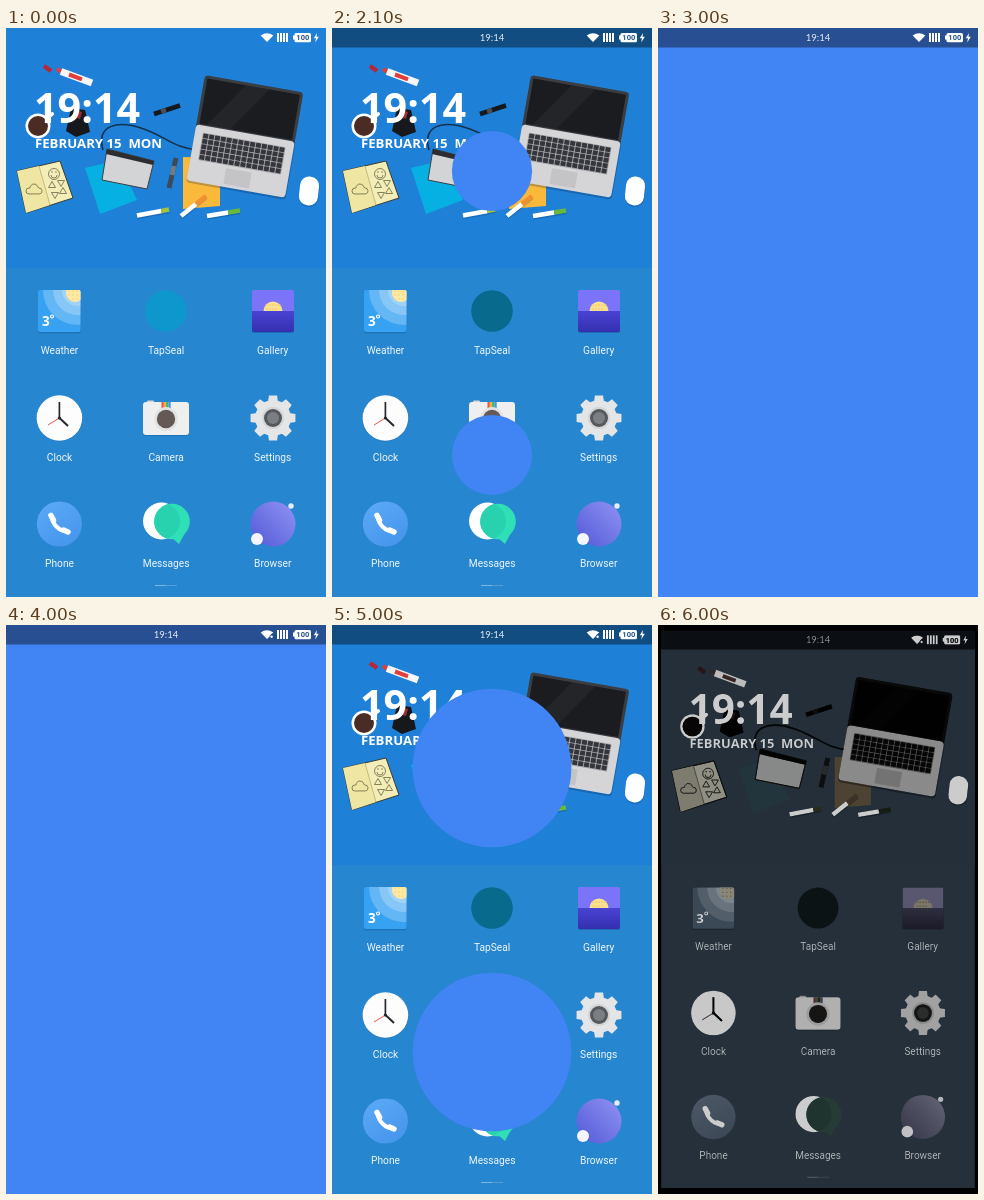
These frames come from a looping animation (320x569 px, 6100 ms). An HTML page with a canvas:

```html
<!DOCTYPE html>
<html lang="en">
<head>
<meta charset="utf-8">
<title>Home screen reveal</title>
<style>
html, body { margin: 0; width: 100%; height: 100%; overflow: hidden; background: #000; }
canvas { display: block; width: 100%; height: 100%; }
svg { position: absolute; }
</style>
</head>
<body>
<canvas id="stage"></canvas>
<svg width="0" height="0">
  <filter id="fade" x="0" y="0" width="1" height="1" color-interpolation-filters="sRGB">
    <feColorMatrix id="mix" type="matrix"/>
    <feComponentTransfer>
      <feFuncR type="gamma"/><feFuncG type="gamma"/><feFuncB type="gamma"/>
    </feComponentTransfer>
  </filter>
</svg>
<script>
const W = 320, H = 569, LOOP = 6100, STEP = 100;
const TAU = Math.PI * 2;
const canvas = document.getElementById('stage');
const c = canvas.getContext('2d');
const dpr = window.devicePixelRatio || 1;
canvas.width = Math.round(W * dpr);
canvas.height = Math.round(H * dpr);

// Drawing helpers
function fill(color) { c.fillStyle = color; c.fill(); }

function disc(x, y, r, color) {
  c.beginPath();
  c.arc(x, y, r, 0, TAU);
  fill(color);
}

function rect(x, y, w, h, color, r = 0) {
  c.beginPath();
  c.roundRect(x, y, w, h, r);
  fill(color);
}

function poly(points, color, edge, width = 1) {
  c.beginPath();
  for (let i = 0; i < points.length; i += 2) c.lineTo(points[i], points[i + 1]);
  c.closePath();
  if (color) fill(color);
  if (edge) { c.strokeStyle = edge; c.lineWidth = width; c.stroke(); }
}

function line(x1, y1, x2, y2, width, color, cap = 'butt') {
  c.beginPath();
  c.moveTo(x1, y1);
  c.lineTo(x2, y2);
  c.lineCap = cap;
  c.lineWidth = width;
  c.strokeStyle = color;
  c.stroke();
}

function text(str, x, y, font, color, align = 'left') {
  c.font = font;
  c.fillStyle = color;
  c.textAlign = align;
  c.fillText(str, x, y);
}

function gradient(x1, y1, x2, y2, from, to) {
  const g = c.createLinearGradient(x1, y1, x2, y2);
  g.addColorStop(0, from);
  g.addColorStop(1, to);
  return g;
}

function clipped(path, draw) {
  c.save();
  c.beginPath();
  path();
  c.clip();
  draw();
  c.restore();
}

function turned(x, y, degrees, draw) {
  c.save();
  c.translate(x, y);
  c.rotate(degrees * TAU / 360);
  draw();
  c.restore();
}

// Wallpaper
function laptop() {
  rect(0, 50, 101, 59, 'rgba(0,30,70,.25)', 4);
  rect(0, 0, 100, 54, '#3a3d42', 4);
  rect(3, 3, 94, 46, '#1a1c20');
  poly([42, 3, 66, 3, 34, 49, 10, 49], 'rgba(255,255,255,.04)');
  rect(0, 50, 100, 57, '#d5d5d7', 4);
  rect(8, 57, 84, 28, '#a3a4a8', 1);
  for (let row = 0; row < 5; row++)
    for (let k = 0; k < 14; k++)
      rect(8.8 + k * 5.95, 57.8 + row * 5.4, 5, 4.6, '#34363b', 0.5);
  rect(37, 88, 26, 16, '#c4c4c7', 1);
}

function notebook() {
  poly([11, 143, 54, 133, 67, 170, 20, 185], '#f3edb8', '#3a3c34', 1);
  poly([11, 143, 33, 138, 44, 177, 20, 185], '#eee6a2');
  line(33, 138, 44, 177, 0.8, '#b8ae6c');
  c.strokeStyle = '#6b6748';
  c.lineWidth = 0.8;
  c.beginPath();
  c.arc(23, 163, 3, 1.6, 5);
  c.arc(28, 160, 4, 3.6, 6);
  c.arc(33, 163, 3, 4.6, 7.6);
  c.closePath();
  c.stroke();
  c.beginPath();
  c.arc(48, 146, 5.5, 0, TAU);
  c.moveTo(51, 147);
  c.arc(48, 147, 3, 0, Math.PI);
  c.stroke();
  disc(46, 144, 0.7, '#6b6748');
  disc(50, 144, 0.7, '#6b6748');
  for (const [x, y, s] of [[46, 157, 1], [55, 155, -1], [49, 167, -1], [57, 163, 1]])
    poly([x - 3.5, y + 2.5 * s, x + 3.5, y + 2.5 * s, x, y - 3.5 * s], null, '#6b6748', 0.8);
}

function marker(x1, y1, x2, y2, split, body, tip, width = 4.5) {
  const mx = x1 + (x2 - x1) * split, my = y1 + (y2 - y1) * split;
  line(x1, y1 + 1.5, x2, y2 + 1.5, width, 'rgba(0,30,70,.2)');
  line(x1, y1, mx, my, width, body);
  line(mx, my, x2, y2, width, tip);
}

function desk() {
  poly([79, 140, 112, 132, 131, 172, 94, 186], '#06b0e2');
  poly([177, 129, 214, 130, 214, 178, 177, 181], '#fbb93c');
  c.beginPath();
  c.moveTo(97, 122);
  c.bezierCurveTo(90, 96, 112, 92, 138, 101);
  c.bezierCurveTo(162, 110, 168, 120, 192, 122);
  c.strokeStyle = '#12324f';
  c.lineWidth = 1.6;
  c.stroke();
  turned(199, 47, 10, laptop);
  poly([101, 121, 148, 133, 141, 161, 96, 152], '#d3d4d6', '#3b3e43', 1);
  poly([101, 121, 148, 133, 147, 137, 100, 126], '#2b2d31');
  notebook();

  turned(303, 163, 6, () => {
    rect(-9, -13, 19, 29, 'rgba(0,30,70,.2)', 9);
    rect(-9.5, -14.5, 19, 29, '#fff', 9);
  });

  line(38, 92, 46, 86, 4, '#fff', 'round');
  disc(32, 98, 12.5, '#fff');
  disc(32, 98, 10, '#4b2c24');
  poly([65, 80, 79, 82, 84, 104, 70, 109, 60, 103], '#17181b');
  poly([69, 82, 76, 84, 74, 91, 67, 89], '#a02a32');

  line(38, 38, 45, 43, 4.5, '#b5283a');
  line(51, 41, 56, 44, 4, '#e23d3a');
  line(55, 43.5, 86, 55, 7, '#f6f6f6');
  line(63, 46.5, 76, 51.3, 4, '#e23d3a');
  line(148, 86, 174, 77.5, 4.5, '#15181d');
  line(155, 83.5, 160, 82, 4.5, '#4a4e55');
  line(170, 130, 163, 160, 5, '#3e4a5a');
  line(168, 138, 166, 147, 5, '#6d7b8c');
  marker(131, 187.5, 163, 181.5, 0.76, '#fff', '#a4c23a');
  marker(175, 188, 200, 168, 0.6, '#fff', '#f09030');
  marker(201, 188, 234, 182.5, 0.64, '#fff', '#68b83c');
}

// App icons
function weather() {
  rect(32, 263, 42.5, 42.5, 'rgba(0,40,90,.2)', 2);
  clipped(() => c.roundRect(32, 262, 42.5, 42, 2), () => {
    rect(32, 262, 43, 43, '#38a2f2');
    for (const r of [35, 25, 16]) disc(72, 262, r, 'rgba(255,255,255,.22)');
    disc(69, 265, 9, '#fde9a4');
    for (let i = 0; i < 12; i++)
      disc(63 + (i % 4) * 4, 263 + Math.floor(i / 4) * 4, 0.7, '#f5cf62');
  });
  text('3', 36, 298, 'bold 13.5px "Open Sans", sans-serif', '#fff');
  c.beginPath();
  c.arc(46, 288.5, 1.5, 0, TAU);
  c.strokeStyle = '#fff';
  c.lineWidth = 1.1;
  c.stroke();
}

function seal(pressed) {
  disc(160, 283, 20.8, pressed ? '#086a8c' : '#0e97cd');
}

function gallery() {
  rect(246, 263, 42, 42, 'rgba(0,30,90,.25)', 2);
  clipped(() => c.roundRect(246, 262, 42, 42, 2), () => {
    rect(246, 262, 42, 21, '#7b73f8');
    disc(267, 283, 9.5, '#fbe08f');
    for (let i = 0; i < 9; i++)
      disc(261 + (i % 5) * 3, 277 + Math.floor(i / 5) * 4, 0.6, '#e6a94c');
    rect(246, 283, 42, 21, gradient(0, 283, 0, 304, '#4a43d2', '#352fb0'));
  });
}

function clock() {
  disc(53.4, 390.5, 23, 'rgba(0,40,90,.15)');
  disc(53.4, 390, 22.8, '#fdfdfd');
  line(53.4, 390, 42, 397, 0.9, '#e8453c');
  line(53.4, 391, 53.4, 374, 1.7, '#26292e');
  line(53, 389.5, 62, 398, 2, '#26292e');
  disc(53.4, 390, 1.6, '#26292e');
}

function camera() {
  rect(141, 372.5, 7, 4, '#d4d5d6', 1);
  rect(137, 375, 46, 33, 'rgba(0,40,90,.2)', 3);
  rect(137, 374, 46, 33, '#efefef', 3);
  ['#e5534b', '#f2b33d', '#45b36b', '#3c9ad8'].forEach((col, i) =>
    rect(155.5 + i * 2.3, 374, 2.3, 7, col));
  disc(160, 391, 12, '#e3e3e3');
  disc(160, 391, 9.2, '#645955');
}

function settings() {
  c.beginPath();
  for (let i = 0; i < 8; i++) {
    const a = i * TAU / 8;
    for (const [da, r] of [[-0.27, 18], [-0.18, 22.8], [0.18, 22.8], [0.27, 18]])
      c.lineTo(267 + r * Math.cos(a + da), 390 + r * Math.sin(a + da));
  }
  c.closePath();
  fill('#e4e5e6');
  disc(267, 390, 11, '#d3d5d6');
  disc(267, 390, 9, '#55585c');
  disc(267, 390, 6, '#7b7e82');
}

function phone() {
  disc(53.4, 496, 22.6, gradient(40, 474, 66, 518, '#5aa8f6', '#4595ec'));
  c.beginPath();
  c.moveTo(46, 489);
  c.bezierCurveTo(46, 496, 54, 504, 61, 503);
  c.strokeStyle = '#fff';
  c.lineWidth = 4;
  c.stroke();
  line(45, 487.5, 47.5, 492, 5.5, '#fff', 'round');
  line(57.5, 502, 62, 504, 5.5, '#fff', 'round');
}

function messages() {
  disc(155.5, 493, 18.5, '#fff');
  poly([180, 503, 173, 516, 165, 509], '#2fe0b6');
  disc(166, 493.5, 17.8, '#2fe0b6');
  clipped(() => c.arc(155.5, 493, 18.5, 0, TAU), () => disc(166, 493.5, 17.8, '#28d2ae'));
}

function browser() {
  disc(267, 496, 22.5, gradient(250, 512, 284, 480, '#5a61da', '#888bf0'));
  disc(251, 511, 6, '#f4f5ff');
  disc(285, 478, 2.7, '#e8ebff');
}

const labels = [
  ['Weather', 'TapSeal', 'Gallery'],
  ['Clock', 'Camera', 'Settings'],
  ['Phone', 'Messages', 'Browser'],
];

function home(pressed) {
  rect(0, 0, W, H, '#2786d0');
  rect(0, 0, W, 240, '#1e80d7');
  desk();
  const big = '"Open Sans", "Noto Sans", sans-serif';
  text('19:14', 28, 95, '700 41.3px ' + big, '#fff');
  text('FEBRUARY 15\u00a0 MON', 29, 119.5, '700 13.2px ' + big, '#fff');

  weather();
  seal(pressed);
  gallery();
  clock();
  camera();
  settings();
  phone();
  messages();
  browser();
  labels.forEach((row, j) => row.forEach((name, i) =>
    text(name, 53.5 + i * 106.6, 326 + j * 106.6, '10.2px Roboto, sans-serif',
      'rgba(255,255,255,.92)', 'center')));
  rect(149, 557, 11, 1, 'rgba(255,255,255,.4)');
  rect(160, 557, 11, 1, 'rgba(255,255,255,.2)');
}

function statusBar(open, activity) {
  if (open) {
    rect(0, 0, W, 19.5, 'rgba(0,0,0,.4)');
    text('19:14', 160, 13.3, '400 9.6px Lato, sans-serif', 'rgba(255,255,255,.88)', 'center');
  }
  c.beginPath();
  c.moveTo(261, 14);
  c.lineTo(254.7, 7.5);
  c.quadraticCurveTo(261, 3, 267.3, 7.5);
  c.closePath();
  fill('#fff');
  if (activity) {
    poly([264, 14, 264, 10.5, 266, 8.5, 271, 8.5, 271, 14], open ? '#1a4f86' : '#1e80d7');
    disc(265.6, 11.8, 1.2, '#fff');
  }
  for (let i = 0; i < 4; i++) rect(271 + i * 3, 5, 2, 9, '#fff');
  rect(287, 7.5, 2, 4, '#fff');
  rect(288.5, 5, 16.5, 9.3, '#fff', 1.5);
  text('100', 296.8, 12.4, 'bold 7.5px Roboto, sans-serif', '#24508a', 'center');
  poly([311, 5, 307.8, 10.3, 310, 10.3, 309.2, 14.5, 312.8, 8.8, 310.5, 8.8], '#fff');
}

// Timing
const SWEEP = 2040, MAX_R = 320, OPEN_AT = 1630, CLOSE_AT = 3637;

function sway(t) {
  return 0.5 - 0.5 * Math.cos(Math.PI * Math.min(1, Math.max(0, t)));
}

function radius(t) {
  return MAX_R * (t < 3650 ? sway((t - OPEN_AT) / SWEEP) : 1 - sway((t - CLOSE_AT) / SWEEP));
}

// Greys weigh red and blue most, so greens sink into the background
const GREY = [0.4, 0.1, 0.5];

function screenOff(k) {
  canvas.style.filter = k ? 'url(#fade)' : 'none';
  const grey = 0.85 * k;
  const rows = GREY.map((_, i) =>
    [...GREY.map((w, j) => grey * w + (i === j ? 1 - grey : 0)), 0, 0].join(' '));
  document.getElementById('mix').setAttribute('values', rows.join(' ') + ' 0 0 0 1 0');
  for (const f of document.querySelectorAll('feComponentTransfer > *')) {
    f.setAttribute('exponent', 1 + 1.2 * k);
    f.setAttribute('amplitude', 1 - 0.2 * k);
  }
}

function draw(t) {
  const off = t >= 6000 ? 1 : t >= 5900 ? 0.5 : 0;
  const scale = 1 - 0.019 * off;
  c.setTransform(dpr, 0, 0, dpr, 0, 0);
  rect(0, 0, W, H, '#000');
  c.translate(W / 2, H / 2);
  c.scale(scale, scale);
  c.translate(-W / 2, -H / 2);
  clipped(() => c.rect(0, 0, W, H), () => {
    home(t >= 1300);
    const r = radius(t);
    if (r > 0) for (const y of [143, 427]) disc(160, y, r, '#4184f3');
    statusBar(t >= 1600, t >= 4000);
  });
  screenOff(off);
}

let start = performance.now(), last = -1;
function tick() {
  const t = Math.floor((performance.now() - start) % LOOP / STEP) * STEP;
  if (t !== last) draw(last = t);
  requestAnimationFrame(tick);
}
tick();
</script>
</body>
</html>
```
